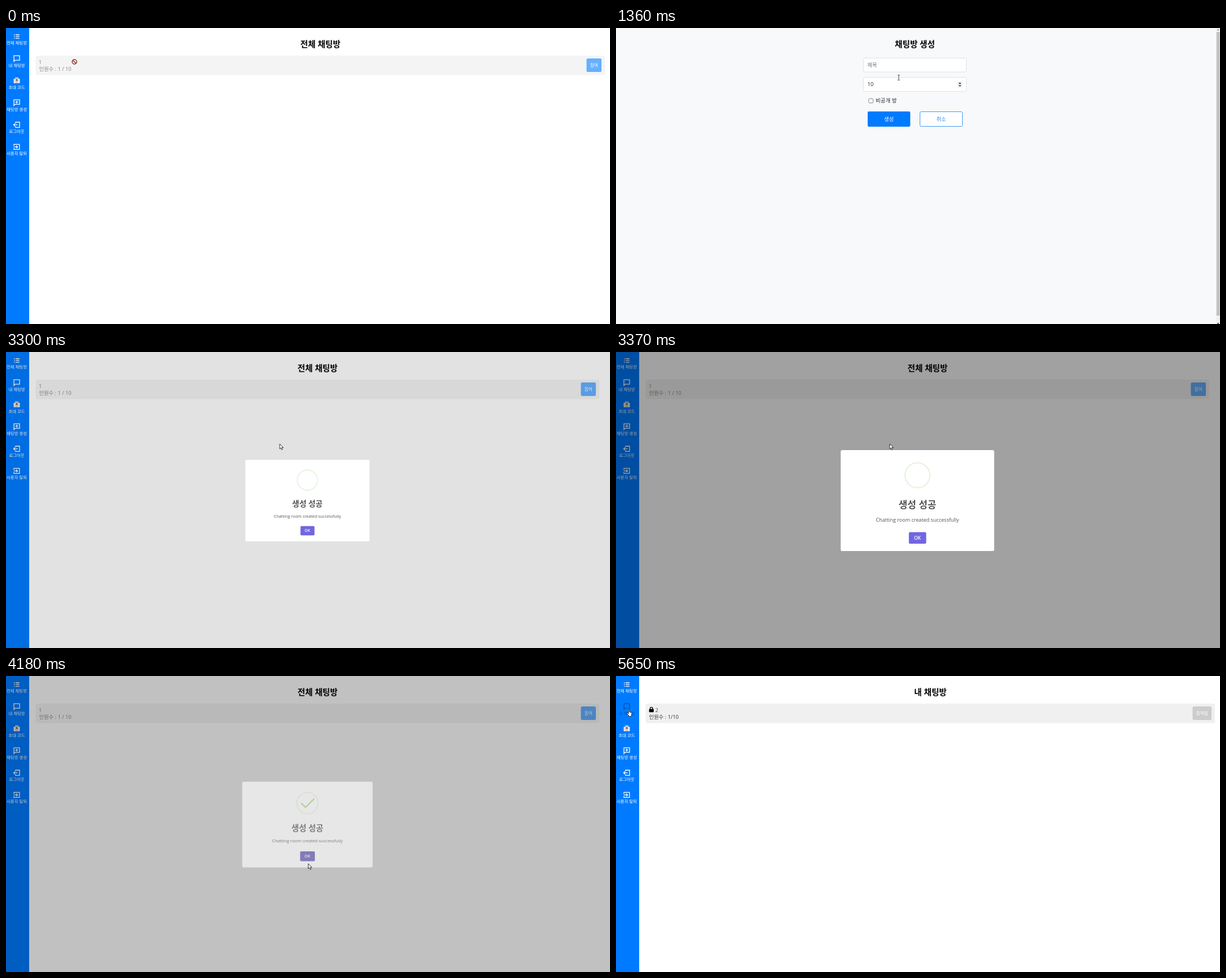
Animation of 1068x525 px, one loop 7.3 s. Source, as an HTML page:

```html
<!DOCTYPE html>
<html lang="ko">
<head>
<meta charset="utf-8">
<style>
html, body { margin: 0; width: 100%; height: 100%; overflow: hidden; background: #fff; }
svg { display: block; width: 1068px; height: 525px; font: 9.3px "Open Sans", "Noto Sans CJK KR", "Noto Sans CJK", sans-serif; }
.title { font-size: 14.6px; font-weight: 700; }
.mid { text-anchor: middle; }
.item { color: #fff; font-size: 7.4px; }
.item.hover { color: #0056b3; }
.icon { fill: none; stroke: currentColor; stroke-width: 1.3; }
</style>
</head>
<body>
<svg id="stage" viewBox="0 0 1068 525"></svg>
<script>
const LOOP = 7300;
const rect = (x, y, w, h, r, fill, more = '') =>
  `<rect x="${x}" y="${y}" width="${w}" height="${h}" rx="${r}" fill="${fill}" ${more}/>`;
const text = (x, y, str, fill, more = '') => `<text x="${x}" y="${y}" fill="${fill}" ${more}>${str}</text>`;
const path = (d, more = '') => `<path d="${d}" ${more}/>`;
const group = (id, body, more = '') => `<g id="${id}" ${more}>${body}</g>`;
const mid = 'class="mid"', title = 'class="mid title"';

const bubble = 'M14 49.2h10v8h-8l-2 2.2z';
const menu = [
  ['전체 채팅방', path('M14.2 12h1.5M17.2 12h6.5M14.2 15.2h1.5M17.2 15.2h6.5M14.2 18.4h1.5M17.2 18.4h6.5')],
  ['내 채팅방', path(bubble)],
  ['초대 코드', path('M16.5 90v-2h5v2', 'stroke="#aab"') + rect(13.5, 90, 11, 8, 1, '#e8e8ea', 'stroke="none"') +
    rect(16.5, 88.5, 5, 9.5, .5, '#ccc', 'stroke="none"') + path('M17.3 92.3h3.4M19 90.6v3.4', 'stroke="#555"')],
  ['채팅방 생성', path(bubble, 'transform="translate(0 78.2)"') + path('M16.5 131.4h5M19 128.9v5')],
  ['로그아웃', path('M17 169v-2h7v9.4h-7v-2M20.5 171.7h-7M16 169.2l-2.5 2.5 2.5 2.5')],
  ['사용자 탈퇴', path('M14 209v-2.6h9.8v9H14V213M13.5 210.9h7M18 208.4l2.5 2.5-2.5 2.5')]
];
const sidebar = rect(0, 0, 41, 525, 0, '#007bff') + menu.map(([label, icon], i) =>
  `<g class="item"><g class="icon">${icon}</g>${text(19, 29.3 + i * 39.2, label, 'currentColor', mid)}</g>`).join('');

const allRooms = group('allTitle', text(556, 33.5, '전체 채팅방', '#000', title)) +
  rect(52.5, 49, 1006.5, 34.5, 3, '#f4f4f4', 'id="row"') +
  text(58, 64.3, '1', '#8a8670') + text(58.5, 76, '인원수 : 1 / 10', '#888') +
  group('join', rect(1026.5, 54, 26.5, 24, 2.5, '#66b0ff') + text(1039.8, 69, '참여', '#fff', mid + ' font-size="7.6"'));

const myRooms = text(556, 33.5, '내 채팅방', '#000', title) +
  rect(52.5, 49, 1006.5, 34.5, 3, '#f0f0f0') +
  rect(58.5, 58.5, 8.2, 5.7, 1, '#000') + path('M60.4 59v-1.4a2.2 2.2 0 0 1 4.4 0V59', 'fill="none" stroke="#000" stroke-width="1.3"') +
  text(69.5, 64.3, '2', '#5a4030') + text(58.5, 76, '인원수 : 1/10', '#333') +
  rect(1019.5, 54, 33.5, 24, 2.5, '#ccc') + text(1036.2, 69, '참여됨', '#fff', mid + ' font-size="7.6"');

const form = rect(0, 0, 1068, 525, 0, '#f8f9fb') +
  rect(1061, 0, 7, 525, 0, '#f1f1f1') + rect(1061.8, 7, 5.7, 503, 0, '#c1c1c1') +
  path('M1062.7 4l2-2.2 2 2.2z', 'fill="#888"') + path('M1062.7 523.3h4l-2 2z', 'fill="#222"') +
  text(528.5, 33.5, '채팅방 생성', '#000', title) +
  rect(437.5, 53.5, 182, 24.5, 2.5, '#fff', 'id="nameBox" stroke="#dee2e6"') +
  rect(437.5, 87.5, 182, 25, 2.5, '#fff', 'stroke="#dee2e6"') +
  text(444.5, 68.8, '', '#777', 'id="name"') + rect(444.5, 60.5, .8, 10, 0, '#222', 'id="caret"') +
  text(444.7, 103.2, '10', '#212529') +
  group('spinner', rect(603.5, 95, 9, 10.5, 1, '#efefef') + path('M605.7 98.9l2.4-2.5 2.4 2.5zM605.7 101.5l2.4 2.5 2.4-2.5z', 'fill="#333"')) +
  rect(447, 125.3, 7.6, 7.6, 1.2, '#fff', 'stroke="#767676" stroke-width=".9"') +
  group('tick', rect(446.5, 124.8, 8.6, 8.6, 1.3, '#0b5fd0') + path('M448.4 129.2l1.8 1.9 3.2-4', 'fill="none" stroke="#fff" stroke-width="1.3"')) +
  text(459, 131.7, '비공개 방', '#212529', 'font-size="9.5"') +
  rect(445, 148, 75.3, 27, 2.2, '#007bff', 'id="create"') + text(482.5, 165, '생성', '#fff', mid) +
  rect(537.5, 148.5, 75, 26, 2.2, '#fff', 'stroke="#3b97f5"') + text(575, 165, '취소', '#2b8ff5', mid);

const dialog = rect(0, 0, 1068, 525, 0, '#000', 'id="shade"') + group('popup',
  rect(390, 169.3, 286, 188.5, 3, '#fff') +
  '<circle cx="533" cy="216.2" r="23.3" fill="none" stroke="#e4f4db" stroke-width="2.2"/>' +
  path('M520 217l8.7 8.7 18.3-18.3', 'id="check" pathLength="1" fill="none" stroke="#a5dc86" stroke-width="2.9" stroke-linecap="round" stroke-linejoin="round" stroke-dasharray="1 2"') +
  text(533, 277.5, '생성 성공', '#545454', mid + ' font-size="17.8" font-weight="700"') +
  text(533, 303, 'Chatting room created successfully', '#545454', mid + ' font-size="9.55"') +
  rect(517, 322.5, 32.3, 21.5, 2.3, '#7066e0', 'id="ok"') +
  text(533, 336.3, 'OK', '#fff', mid + ' font-size="9" font-weight="600"'));

const outline = 'fill="#fff" stroke="#222" stroke-width=".9" stroke-linejoin="round"';
const cursors =
  group('arrow', path('M0 0v9l2-1.9 1.5 3.2 1.6-.8-1.5-3h2.8z', outline)) +
  group('hand', path('M-.9 .8q.9-1.4 1.8 0v4l3.3 1q1 .4.8 1.6l-.8 3.5v1.8h-4.7v-1.6l-3.2-3.6q-.4-1.5 1-1.1l1.8 1.4z', outline)) +
  group('beam', path('M-2-4.5h1.5l.5.5.5-.5H2M0-4v8M-2 4.5h1.5L0 4l.5.5H2', 'fill="none" stroke="#333" stroke-width=".9"')) +
  group('ban', '<circle r="4" fill="#fff" stroke="#8e2a1c" stroke-width="1.5"/>' + path('M-2.8-2.8l5.6 5.6', 'stroke="#8e2a1c" stroke-width="1.5"'));

const $ = id => document.getElementById(id);
$('stage').innerHTML = sidebar + group('all', allRooms) + group('mine', myRooms) + group('form', form) +
  group('dialog', dialog) + '<circle id="click" r="7" fill="#d8cf30" opacity=".75"/>' + group('cursor', cursors);
const items = [...document.querySelectorAll('.item')];

// Pointer path: time, x, y
const track = [
  [0, 121, 60], [40, 121, 60], [420, 27, 157], [500, 27, 157], [600, 22, 142], [860, 22, 142],
  [1150, 330, 108], [1360, 500, 88], [1570, 487, 68], [1950, 487, 68], [2290, 477, 125],
  [2560, 477, 125], [2830, 484, 163], [3440, 484, 163], [3910, 538, 328], [4040, 542, 336],
  [4170, 542, 336], [4240, 494, 316], [4400, 270, 190], [4700, 45, 31], [4780, 40, 28],
  [4910, 28, 25], [5000, 28, 25], [5300, 23, 59], [LOOP, 23, 59]
];
const clamp = v => Math.max(0, Math.min(1, v));
const part = (t, from, to) => clamp((t - from) / (to - from));
const show = (id, on) => $(id).style.display = on ? '' : 'none';
const set = (id, name, value) => $(id).setAttribute(name, value);

function keyed(keys, t) {
  const i = Math.max(1, keys.findIndex(k => k[0] >= t));
  const [a, b] = [keys[i - 1], keys[i]];
  const p = part(t, a[0], b[0]);
  return a.slice(1).map((v, n) => v + (b[n + 1] - v) * p);
}

function draw(t) {
  const [x, y] = keyed(track, t);
  const within = (l, top, r, b) => x >= l && x <= r && y >= top && y <= b;
  const onForm = t >= 890 && t < 3230;
  const open = t >= 3275 && t < 4230;
  const mine = t >= 5580;
  show('form', onForm);
  show('all', !mine);
  show('mine', mine);
  show('dialog', open);

  // The modal leaves room for the page scrollbar
  const gap = t >= 3230 && t < 4310 ? 10 : 0;
  set('allTitle', 'transform', `translate(${-gap / 2})`);
  set('join', 'transform', `translate(${-gap})`);
  set('row', 'width', 1006.5 - gap);

  let hovered = false;
  items.forEach((el, i) => {
    const top = 8 + i * 39.2;
    const on = !onForm && !open && within(0, top, 41, top + 26);
    el.classList.toggle('hover', on);
    hovered ||= on;
  });

  const typed = t >= 1850, focus = t >= 1640 && t < 2290;
  $('name').textContent = typed ? '2' : '제목';
  set('name', 'fill', typed ? '#212529' : '#777');
  set('nameBox', 'stroke', focus ? '#86b7fe' : '#dee2e6');
  show('caret', focus);
  set('caret', 'x', typed ? 450.3 : 444.5);
  const onNumber = within(437, 87, 620, 113), onCreate = within(445, 148, 520, 175);
  show('spinner', onNumber);
  show('tick', t >= 2290);
  set('create', 'fill', onCreate ? '#0069d9' : '#007bff');

  const leave = part(t, 4150, 4230);
  const [grow] = keyed([[0, .7], [135, 1.05], [240, .95], [300, 1], [LOOP, 1]], Math.max(0, t - 3275));
  set('shade', 'opacity', .4 * part(t, 3270, 3380) * (1 - leave));
  set('popup', 'opacity', 1 - leave);
  set('popup', 'transform', `translate(533 263.5) scale(${grow * (1 - leave / 2)}) translate(-533 -263.5)`);
  const drawn = part(t, 3680, 3905);
  show('check', drawn > 0);
  set('check', 'stroke-dashoffset', 1 - drawn);
  set('ok', 'fill', within(517, 322, 549, 344) ? '#5a52b3' : '#7066e0');

  show('click', t >= 4090 && t < 4180);
  set('click', 'transform', `translate(${x} ${y})`);
  set('cursor', 'transform', `translate(${x} ${y})`);
  let kind = 'arrow';
  if (hovered || onForm && onCreate) kind = 'hand';
  else if (onForm && (onNumber || within(437, 53, 620, 78))) kind = 'beam';
  else if (!onForm && !open && within(52, 49, 1059, 83)) kind = 'ban';
  for (const id of ['arrow', 'hand', 'beam', 'ban']) show(id, id === kind);
}

const start = performance.now();
function frame() {
  draw((performance.now() - start) % LOOP);
  requestAnimationFrame(frame);
}
frame();
</script>
</body>
</html>
```
